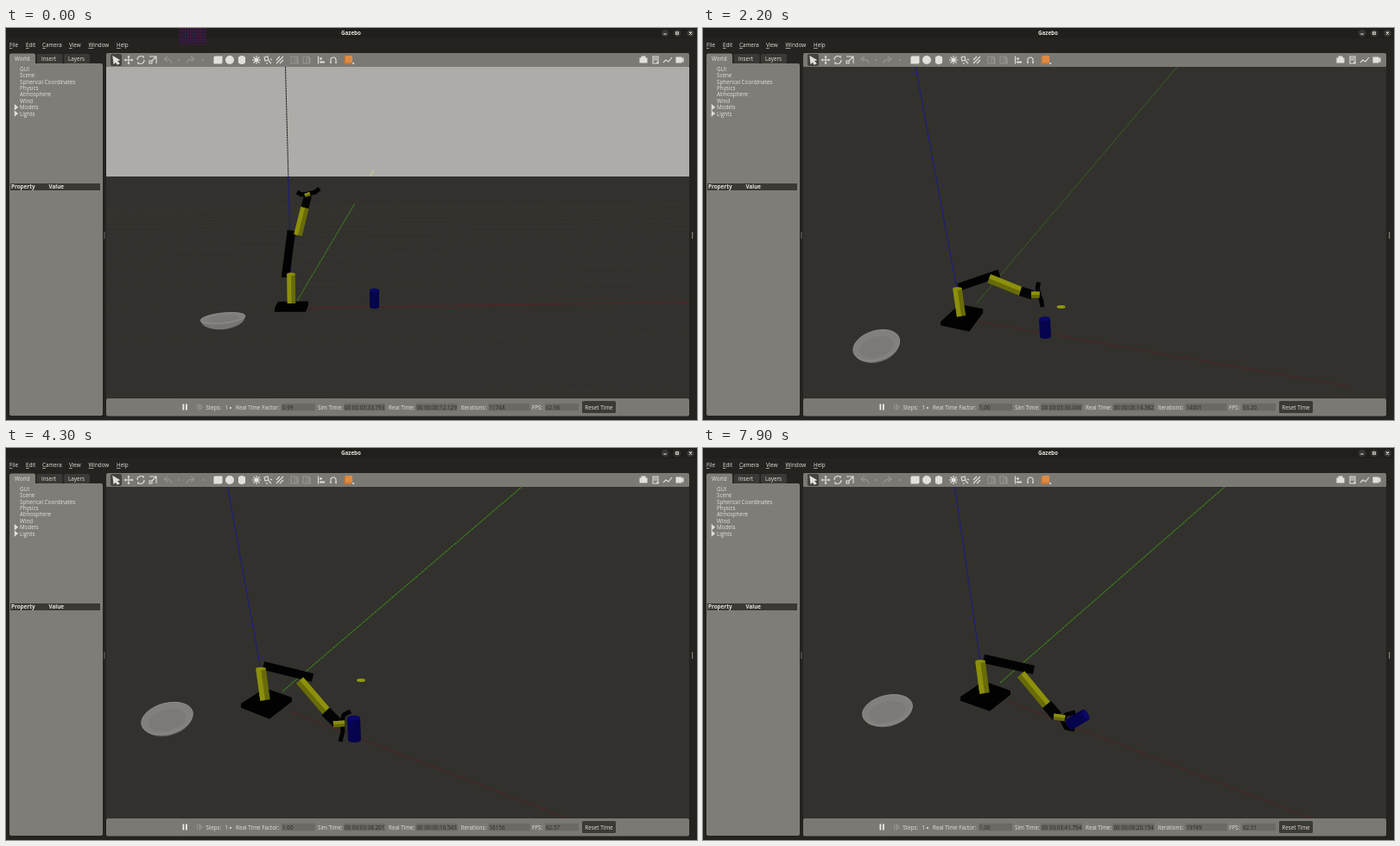
Recreate the animation shown at these times as an HTML page. Size 800 px wide and 454 px high, loop 8 s.

```html
<!DOCTYPE html>
<html lang="en">
<head>
<meta charset="utf-8">
<title>Gazebo</title>
<style>
html, body { margin: 0; width: 100%; height: 100%; overflow: hidden; background: #242320; }
svg { display: block; width: 100vw; height: 100vh; }
text { font: 6.3px "Open Sans", "Noto Sans", sans-serif; fill: #e4e2dc; white-space: pre; }
.bold { font-weight: 700; }
.value { fill: #292825; }
.icon { fill: none; stroke: #e2e0da; stroke-width: 1.1; }
.solid { fill: #e2e0da; }
.dim { opacity: .28; }
</style>
</head>
<body>
<svg viewBox="0 0 800 454" preserveAspectRatio="none">
  <defs>
    <clipPath id="view"><rect x="116" y="45" width="675" height="384"/></clipPath>
    <pattern id="speckle" width="3" height="3" patternUnits="userSpaceOnUse">
      <rect width="3" height="3" fill="#201527"/>
      <rect width="1.4" height="1.4" fill="#65213f"/>
      <rect x="1.5" y="1.5" width="1.4" height="1.4" fill="#292457"/>
    </pattern>
  </defs>
  <rect width="800" height="454" fill="#242320"/>
  <rect width="800" height="12" fill="#201f1c"/>
  <g id="chrome"></g>
  <g id="scene" clip-path="url(#view)"></g>
  <rect id="glitch" x="200" y="0" width="32" height="19" fill="url(#speckle)"/>
</svg>
<script>
const LOOP = 8000, STEP = 100;
const byId = id => document.getElementById(id);

// Static window parts

const label = (x, y, s, attrs = '') => `<text x="${x}" y="${y}" ${attrs}>${s}</text>`;
const rect = (x, y, w, h, fill, r = 0) =>
  `<rect x="${x}" y="${y}" width="${w}" height="${h}" rx="${r}" fill="${fill}"/>`;
const icon = (x, d, cls = '', y = 37) =>
  `<path class="icon ${cls}" transform="translate(${x} ${y})" d="${d}"/>`;

function windowFrame() {
  const menus = [[4, 'File'], [23, 'Edit'], [42, 'Camera'], [73, 'View'], [95.5, 'Window'], [128, 'Help']];
  const buttons = [[763, 'M-1.7 1H1.7'], [777, 'M-1.3-1.3H1.3V1.3H-1.3Z'], [792.5, 'M-1.6-1.6L1.6 1.6M1.6-1.6L-1.6 1.6']];
  return label(399.5, 8.3, 'Gazebo', 'class="bold" text-anchor="middle"')
    + menus.map(([x, s]) => label(x, 22, `<tspan text-decoration="underline">${s[0]}</tspan>${s.slice(1)}`)).join('')
    + buttons.map(([x, d]) => `<circle cx="${x}" cy="6" r="4.3" fill="#373633"/>` + icon(x, d, '', 6)).join('')
    + rect(113.4, 236, 1.2, 8, '#605e5a') + rect(794, 236, 1.2, 8, '#807e79');
}

function sidePanel() {
  const tree = ['GUI', 'Scene', 'Spherical Coordinates', 'Physics', 'Atmosphere', 'Wind', 'Models', 'Lights'];
  return rect(4, 41, 108, 408, '#7f7d78', 2) + rect(4, 29.5, 30, 14, '#7f7d78', 2)
    + rect(35.5, 30, 30, 11, '#3b3936', 2) + rect(67, 30, 30, 11, '#3b3936', 2)
    + label(10, 37.8, 'World') + label(41, 37.8, 'Insert') + label(72, 37.8, 'Layers')
    + tree.map((s, i) => label(16, 50 + i * 7.36, s)
      + (i > 5 ? icon(10.3, 'M0-2.5L3 0L0 2.5Z', 'solid', 47.6 + i * 7.36) : '')).join('')
    + rect(5, 180, 104, 8, '#3a3935')
    + label(6, 186.3, 'Property', 'class="bold"') + label(49.5, 186.3, 'Value', 'class="bold"');
}

function toolbar() {
  const caret = 'M-1-.5L0 .5L1-.5';
  const undo = 'M5 4Q4-1-3-1M0-4L-4-1L0 2', redo = 'M-5 4Q-4-1 3-1M0-4L4-1L0 2';
  const pages = 'M-4-4H3V4H-4ZM0-2H4V4H0Z';
  return rect(116, 29, 675, 16.5, '#7b7974', 2) + rect(121, 30, 13, 14, '#45433f', 2)
    + icon(127, 'M-3-4L4 0L1 1L4 4L2 5L0 2L-2 4Z', 'solid')
    + icon(142, 'M-4 0H4M0-4V4M-3-1L-4.5 0L-3 1M3-1L4.5 0L3 1M-1-3L0-4.5L1-3M-1 3L0 4.5L1 3')
    + icon(156, 'M-4 0A4 4 0 0 1 3-3V-5M4 0A4 4 0 0 1-3 3V5')
    + icon(170, 'M-4 4H-1V1H-4ZM-4-4H4V4M-1 1L4-4M1-4H4V-1')
    + icon(187, undo, 'dim') + icon(200, caret, 'dim') + icon(214, redo, 'dim') + icon(228, caret, 'dim')
    + icon(245, 'M-4-3L-3-4H5V3L4 4H-4Z', 'solid')
    + '<circle class="solid" cx="259" cy="37" r="5"/>'
    + icon(273, 'M-3.5-3Q0-6 3.5-3V3Q0 6-3.5 3Z', 'solid')
    + icon(290, 'M-1.5-1.5H1.5V1.5H-1.5ZM-5 0H5M0-5V5M-3.5-3.5L3.5 3.5M3.5-3.5L-3.5 3.5')
    + icon(303, 'M-4-3L0-4L1 0L-3 1ZM1 1L4 4M3-1L5 0M-1 3V5')
    + icon(317, 'M-4 0L0-4M-4 4L4-4M0 4L4 0')
    + icon(334, pages, 'dim') + icon(348, pages, 'dim')
    + icon(365, 'M-3.5-4.5V4.5M-2-2H1M-2 2H4M-2 3H4M-2-1H1')
    + icon(379, 'M-3 4V0A3 3 0 0 1 3 0V4M-4 3H-2M2 3H4')
    + rect(391.5, 33, 8.5, 9, '#c67735') + rect(393, 32, 8, 8, '#df8a42') + icon(402, caret, '', 41)
    + icon(738, 'M-4-2H-2V-4H2V-2H4V3H-4Z', 'solid')
    + icon(752, 'M-3-4H3V4H-3ZM-2-2H2M-2 0H2M1 3H4')
    + icon(766, 'M-5 3L-2 0L1 2L5-3')
    + icon(780, 'M-4-3H2V3H-4ZM2 0L4-2V2Z', 'solid');
}

function statusBar() {
  const fields = [[266, 'Real Time Factor:', 319, 39, 'factor'], [361, 'Sim Time:', 391, 48, 'sim'],
    [443, 'Real Time:', 474.5, 48, 'real'], [526.5, 'Iterations:', 558.5, 48, 'iterations'], [609, 'FPS:', 624, 39, 'fps']];
  return rect(116, 429, 675, 20.5, '#7b7974', 2)
    + rect(204.5, 435.5, 1.8, 7, '#eceae4') + rect(208, 435.5, 1.8, 7, '#eceae4')
    + icon(224, 'M-2.5-3V3M0-3L3 0L0 3Z', 'dim', 439)
    + label(231.5, 441.5, 'Steps:') + label(253.5, 441.5, '1') + icon(260, 'M-1-.5L0 .5L1-.5', '', 440)
    + fields.map(([x, s, fx, w, id]) => label(x, 441.5, s) + rect(fx, 434.8, w, 8.6, '#6b6965')
      + label(fx + 1, 441.5, '', `id="${id}" class="value"`)).join('')
    + rect(667, 432, 39, 14, '#3c3a37', 1.5) + label(686.5, 441.5, 'Reset Time', 'text-anchor="middle"');
}

// Key poses. Arm parts are [x1, y1, x2, y2, width]; bowl is [cx, cy, rx, ry, tilt, depth].

const overhead = {
  t: 5400, sky: [-70], zAxis: [291.5, 45, 321, 248], green: [344, 272, 604, 45, .9], red: [352, 293, 705, 429, .65],
  plate: [325, 270, 356, 281, 332, 300, 298, 288], column: [326, 284, 321, 247, 11.5],
  upper: [325, 244, 383, 257, 10], fore: [368, 262, 398, 298, 11], wrist: [398, 297, 410, 311, 13],
  palm: [406, 311, 419, 313, 7], claw: [426, 298, 418, 303, 415, 313, 418, 322, 415, 332],
  can: [431, 328, 430.5, 303, 15], bowl: [213.5, 303.5, 29.5, 17, -14, 19], pivot: [435, 261]
};
const grasped = { claw: [431, 306, 420, 309, 416, 316, 420, 324, 430, 326], can: [424, 320, 443, 309, 14] };
const poses = [{
  t: 0, sky: [172], zAxis: [323.5, 45, 330, 290], green: [337, 316, 404, 203, .8], red: [347, 324, 791, 317.5, .8],
  plate: [315, 317, 350, 316.5, 347, 324, 311, 324], column: [330.5, 319, 330, 285, 9.5],
  upper: [323.5, 289, 330.5, 234.5, 9.5], fore: [338, 240, 346, 208, 9.5], wrist: [346, 208, 349.5, 194, 9],
  palm: [346, 194, 352, 192, 4], claw: [337, 190, 342, 193, 350, 192, 358, 190, 363, 186],
  can: [426.5, 323, 426.5, 304, 11], bowl: [251, 336, 26, 6, -6, 13], pivot: [440, 297]
}, {
  t: 800, sky: [154], zAxis: [322, 45, 329, 286], green: [337, 316, 425, 149, .95], red: [350, 324, 791, 317.5, .8],
  plate: [315, 317, 350, 316.5, 347, 325, 311, 325], column: [331, 319, 330, 286, 9.5],
  upper: [327, 287, 357, 244, 8], fore: [358, 248, 388, 233, 9], wrist: [388, 232, 398, 226, 8],
  palm: [396, 228, 406, 223, 5], claw: [393, 222, 404, 220, 412, 220, 411, 226, 403, 227],
  can: [426.5, 324, 426.5, 304, 11], bowl: [251.5, 338, 26, 7, -6, 14], pivot: [440, 297]
}, {
  t: 1400, sky: [-20], zAxis: [263, 45, 316, 321], green: [338, 330, 540, 45, .04], red: [337, 352, 780, 403, .65],
  plate: [311, 334, 341, 337, 331, 358, 301, 354], column: [320.5, 347, 317, 321, 9.5],
  upper: [317, 320, 357, 301, 8], fore: [349, 308, 383, 316, 10], wrist: [383, 316, 396, 317, 9],
  palm: [395, 317, 402, 317, 7], claw: [399, 303, 398, 311, 401, 317, 404, 321, 407, 327],
  can: [408.5, 362, 408, 346, 11], bowl: [241, 384, 23.5, 16, -20, 19], pivot: [440, 298]
}, {
  t: 3100, sky: [-60], zAxis: [227, 45, 269, 282], green: [293, 306, 559, 45, .9], red: [300, 327, 715, 429, .65],
  plate: [281, 304, 305, 312, 283, 334, 246, 324], column: [275, 319, 269, 280, 11.5],
  upper: [272, 278, 327, 265, 10], fore: [311, 270, 352, 293, 11], wrist: [350, 292, 365, 300, 13],
  palm: [363, 300, 376, 300, 8], claw: [377, 285, 375, 291, 376, 300, 378, 310, 377, 319],
  can: [383, 352, 381.5, 327, 15], bowl: [155.5, 349, 32.5, 18, -15, 20], pivot: [386, 351]
}, {
  ...overhead,
  t: 4300, zAxis: [256.5, 45, 295, 257], green: [320, 282, 597, 45, .9], red: [331, 306, 650, 429, .65],
  plate: [300, 278, 331, 289, 305, 309, 272, 296], column: [300, 292, 295, 255.5, 11.5],
  upper: [298, 252, 355, 266, 10], fore: [340, 269, 371, 305, 11], wrist: [370, 305, 383, 318, 13],
  palm: [379, 320, 392, 319, 7], claw: [399, 305, 391, 309, 389, 317, 390, 328, 387, 340],
  can: [403.5, 338, 402.5, 313, 15], bowl: [186.5, 313, 30.5, 17.5, -15, 20], pivot: [411, 269]
}, { ...overhead, t: 5300 }, { ...overhead, t: 6200 }, { ...overhead, ...grasped, t: 7200 }, { ...overhead, ...grasped, t: LOOP }];

const mix = (a, b, k) => a + (b - a) * k;

function poseAt(t) {
  const i = poses.findIndex(p => p.t > t), from = poses[i - 1], to = poses[i];
  const k = (t - from.t) / (to.t - from.t), pose = {};
  for (const part in from) if (part !== 't') pose[part] = from[part].map((v, n) => mix(v, to[part][n], k));
  return pose;
}

// Scene drawing

const line = ([x1, y1, x2, y2], stroke, width, extra = '') =>
  `<path d="M${x1} ${y1}L${x2} ${y2}" stroke="${stroke}" stroke-width="${width}" ${extra}/>`;
const ellipse = (x, y, rx, ry, tilt, fill, extra = '') =>
  `<ellipse cx="${x}" cy="${y}" rx="${rx}" ry="${ry}" transform="rotate(${tilt} ${x} ${y})" fill="${fill}" ${extra}/>`;

function yellowBar(bar) {
  const [x1, y1, x2, y2, w] = bar, len = Math.hypot(x2 - x1, y2 - y1) || 1;
  const dx = (y2 - y1) / len * w / 4, dy = (x1 - x2) / len * w / 4;
  return line(bar, '#686b08', w) + line([x1 + dx, y1 + dy, x2 + dx, y2 + dy], '#8c900b', w / 2);
}

function cylinder(bar) {
  const [x1, y1, x2, y2, w] = bar, tilt = Math.atan2(y2 - y1, x2 - x1) * 180 / Math.PI + 90;
  return ellipse(x1, y1, w / 2, w / 5, tilt, '#05044c') + line(bar, '#05044c', w)
    + ellipse(x2, y2, w / 2, w / 4.5, tilt, '#090865');
}

function plate([ax, ay, bx, by, cx, cy, dx, dy]) {
  const h = 4.7;
  return `<path fill="#020202" d="M${ax} ${ay}L${bx} ${by}V${by + h}L${cx} ${cy + h}L${dx} ${dy + h}V${dy}Z"/>`;
}

function bowl([x, y, rx, ry, tilt, depth]) {
  return `<path transform="translate(${x} ${y}) rotate(${tilt})" fill="#767572" d="M${-rx} 0A${rx} ${depth} 0 0 0 ${rx} 0Z"/>`
    + ellipse(x, y, rx, ry, tilt, '#81807d', 'stroke="#92918e" stroke-width=".8"')
    + ellipse(x, y + ry * .12, rx * .72, ry * .7, tilt, '#7b7a77');
}

function grid(horizon) {
  if (horizon < 0) return '';
  let d = '';
  for (let k = -2; k < 16; k++) d += `M116 ${horizon + 765 / (5 + k)}l675-8`;
  return `<path d="${d}" stroke="#45443f" stroke-width=".5" opacity="${horizon / 400}"/>`;
}

function backdrop(p) {
  const [horizon] = p.sky, [x1, y1, x2, y2] = p.zAxis;
  let out = rect(116, 45, 675, 384, '#32312d') + grid(horizon) + line(p.zAxis, '#1d1b85', 1.1);
  if (horizon > 45) {
    const crossing = mix(x1, x2, (horizon - y1) / (y2 - y1));
    out += rect(116, 45, 675, horizon - 45, '#adaca8')
      + line([x1, y1, crossing, horizon], '#22222a', 1, 'stroke-dasharray="2.5 .5"')
      + line([422, horizon - 1, 426, horizon - 7], '#ccd58c', 1.1);
  }
  return out;
}

function drawScene(t) {
  const p = poseAt(t), [px, py] = p.pivot;
  const claw = p.claw.reduce((d, v, i) => d + (i ? i % 2 ? ' ' : 'L' : 'M') + v, '');
  byId('scene').innerHTML = backdrop(p)
    + line(p.red, '#701520', .9, `opacity="${p.red[4]}" stroke-dasharray="5 .7"`)
    + line(p.green, '#3d861c', 1.1, `opacity="${p.green[4]}" stroke-dasharray="4 .5"`)
    + bowl(p.bowl) + plate(p.plate) + line(p.upper, '#020202', p.upper[4])
    + yellowBar(p.column) + ellipse(p.column[2], p.column[3], p.column[4] / 2, 1.8, 0, '#8c900b')
    + yellowBar(p.fore) + line(p.wrist, '#040404', p.wrist[4])
    + `<path d="${claw}" fill="none" stroke="#030303" stroke-width="5" stroke-linejoin="round"/>`
    + yellowBar(p.palm) + cylinder(p.can)
    + (t >= 400 && t <= 5400 ? ellipse(px, py, 5, 1.9, 0, '#929a0c') : '');
}

// Status readouts: [time, sim ms, real ms, frames per second]

const readings = [[0, 33793, 12129, 62.98], [800, 34596, 12931, 63.04], [1400, 35198, 13533, 63.71],
  [3100, 36999, 15338, 62.63], [4300, 38201, 16543, 62.57], [5300, 39201, 17548, 62.56],
  [7900, 41794, 20154, 62.51], [LOOP, 41894, 20254, 62.51]];

const clock = (min, ms) => `00 00:${min}:${(ms / 1000).toFixed(3).padStart(6, '0')}`;

function drawStatus(t) {
  const i = readings.findIndex(r => r[0] > t), from = readings[i - 1], to = readings[i];
  const [, sim, real, fps] = from.map((v, n) => mix(v, to[n], (t - from[0]) / (to[0] - from[0])));
  byId('factor').textContent = t < 1100 ? '0.99' : '1.00';
  byId('sim').textContent = clock('03', sim);
  byId('real').textContent = clock('00', real);
  byId('iterations').textContent = Math.round(sim - 22045);
  byId('fps').textContent = fps.toFixed(2);
}

byId('chrome').innerHTML = windowFrame() + sidePanel() + toolbar() + statusBar();

let shown = -1;
function tick() {
  const t = Math.floor(performance.now() % LOOP / STEP) * STEP;
  if (t !== shown) {
    shown = t;
    drawScene(t);
    drawStatus(t);
    byId('glitch').style.display = t < STEP ? '' : 'none';
  }
  requestAnimationFrame(tick);
}
tick();
</script>
</body>
</html>
```
